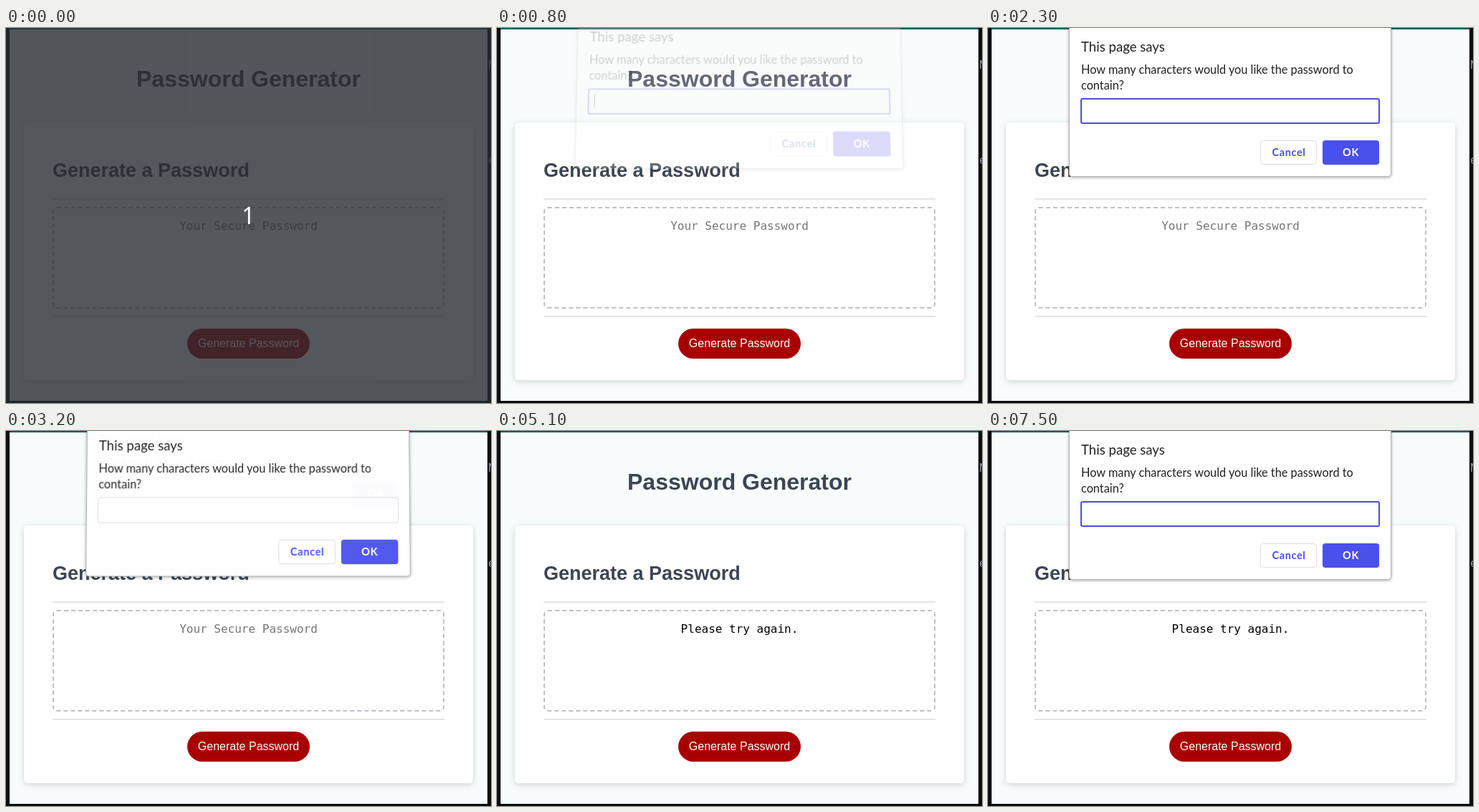
Recreate the animation shown at these times as an HTML page. Size 677x524 px, loop 8 s.

```html
<!DOCTYPE html>
<html lang="en">
<head>
<meta charset="utf-8">
<title>Password Generator</title>
<style>
  html, body { margin: 0; width: 100%; height: 100%; overflow: hidden; background: #0b0b0d; }
  svg, div { position: absolute; left: 0; top: 0; }
  svg { width: 677px; height: 524px; overflow: visible; }
  #stage { width: 677px; height: 524px; overflow: hidden; }
  #output {
    left: 65px; top: 250px; width: 547px; height: 142px; box-sizing: border-box;
    border: 2px dashed #c0c0c8; border-radius: 6px;
  }
  .sans { font-family: "Liberation Sans", Arial, sans-serif; }
  .mono { font-family: "DejaVu Sans Mono", monospace; font-size: 16px; }
  .heading { font-weight: bold; fill: #3c4553; }
  .middle { text-anchor: middle; }
  .card { fill: #fff; filter: drop-shadow(0 2px 4px rgba(0, 0, 0, .17)); }
  .dialog { font: 16.3px Lato, sans-serif; fill: #1f2023; transform-origin: 338px 0; }
  .dialog .title { font-size: 18.6px; }
  .dialog .label { font-size: 14.5px; font-weight: bold; letter-spacing: .6px; text-anchor: middle; }
  .panel { fill: #fff; stroke: #b4b4b6; filter: drop-shadow(0 1px 2px rgba(0, 0, 0, .35)); }
  .blue { fill: #4a50ec; }
  .white { fill: #fff; }
  .outline { fill: #fff; stroke: #dadce0; }
  .hover { fill: #fff; }
</style>
</head>
<body>
<div id="stage">
  <svg>
    <rect width="677" height="524" fill="#0b0b0d"/>
    <rect x="5" width="667" height="521" fill="#f7fdfc"/>
    <rect x="5" width="667" height="2" fill="#1b5a62"/>
    <g class="mono" font-size="14" fill="#8a8fa3">
      <text x="673" y="57">N</text>
      <text x="673" y="190">e</text>
    </g>
    <rect class="card" x="25" y="132" width="627" height="360" rx="5"/>
    <g class="sans">
      <text class="heading middle" x="338.5" y="82" font-size="32">Password Generator</text>
      <text class="heading" x="65" y="208" font-size="27">Generate a Password</text>
      <path d="M65 239H612M65 403H612" stroke="#e3e4e6" stroke-width="2"/>
      <rect x="253" y="420" width="171" height="42" rx="21" fill="#a80000"/>
      <text class="white middle" x="338.5" y="446" font-size="16">Generate Password</text>
    </g>
    <text id="message" class="mono middle" x="338.5" y="282"></text>
  </svg>
  <div id="output"></div>

  <svg id="prompt" class="dialog">
    <rect class="panel" x="113.5" y="-40" width="449" height="247.5" rx="4"/>
    <text class="title" x="130" y="33">This page says</text>
    <text x="130" y="64">How many characters would you like the password to</text>
    <text x="130" y="86">contain?</text>
    <rect class="outline" x="129.5" y="98.5" width="417" height="35" rx="3"/>
    <rect id="focus" x="130" y="99" width="416" height="34" rx="2" fill="#fff" stroke="#4a50dc" stroke-width="2"/>
    <rect id="caret" x="138" y="107" width="1" height="17"/>
    <rect class="outline" x="380.5" y="157.5" width="78" height="33" rx="4"/>
    <text class="label blue" x="420" y="179">Cancel</text>
    <rect class="blue" x="467" y="157" width="79" height="34" rx="4"/>
    <rect id="promptHover" class="hover" x="467" y="157" width="79" height="34" rx="4"/>
    <text class="label white" x="506.5" y="179">OK</text>
  </svg>

  <svg id="alert" class="dialog">
    <rect class="panel" x="113.5" y="-40" width="449" height="175.5" rx="4"/>
    <text class="title" x="130" y="33">This page says</text>
    <text x="130" y="64">Input must be an integer.</text>
    <rect class="blue" x="481" y="84" width="66" height="36" rx="4"/>
    <rect id="alertHover" class="hover" x="481" y="84" width="66" height="36" rx="4"/>
    <rect x="483.5" y="86.5" width="61" height="31" rx="3" fill="none" stroke="#fff"/>
    <text class="label white" x="514.5" y="107">OK</text>
  </svg>

  <svg id="countdown">
    <rect width="677" height="524" fill="rgba(41, 44, 50, .795)"/>
    <text class="white middle" x="338.5" y="274" font-size="32" font-family="Noto Sans, sans-serif">1</text>
  </svg>
</div>

<script>
const LOOP = 8000, STEP = 100;
const el = id => document.getElementById(id);

// Poses: [start ms, tilt, opacity]
const promptPoses = [
  [0, 1, 0], [800, 1, .2], [900, .45, .95], [1000, 0, 1],
  [3200, .42, 1], [3300, 1, .2], [3400, 1, 0],
  [6100, .65, .71], [6200, 0, 1]
];
const alertPoses = [
  [0, 1, 0], [3200, 1, .03], [3300, .62, .75], [3400, 0, 1],
  [4900, .42, 1], [5000, 1, .2], [5100, 1, 0]
];

const show = (node, visible) => node.style.visibility = visible ? "visible" : "hidden";
const ramp = (t, from, length) => Math.min(1, Math.max(0, (t - from) / length));

// Swings a dialog about its top edge, bottom towards the viewer.
function pose(node, poses, t) {
  const [, tilt, opacity] = poses.findLast(p => p[0] <= t);
  node.style.opacity = opacity;
  node.style.transform = tilt
    ? `matrix3d(1,0,0,0, 0,${1 - .005 * tilt},0,${(-.0000943 * tilt).toFixed(8)}, 0,0,1,0, 0,${-13.9 * tilt},0,1)`
    : "none";
}

function caretOn(t) {
  if (t >= 3100 && t < 6100) return false;
  const opened = t < 6100 ? 800 : 6000;
  return (t - opened) % 1000 < 500;
}

function draw(now) {
  const t = Math.floor(now % LOOP / STEP) * STEP;
  show(el("countdown"), t < 100);
  pose(el("prompt"), promptPoses, t);
  pose(el("alert"), alertPoses, t);
  show(el("focus"), t < 3100 || t >= 6100);
  show(el("caret"), caretOn(t));
  el("promptHover").style.opacity = t < 6000 ? .05 * ramp(t, 2300, 300) : 0;
  el("alertHover").style.opacity = .05 * ramp(t, 4600, 200);

  const retry = t >= 5000;
  el("message").textContent = retry ? "Please try again." : "Your Secure Password";
  el("message").style.fill = retry ? "#000" : "#757575";
}

function tick() {
  draw(performance.now());
  requestAnimationFrame(tick);
}
tick();
</script>
</body>
</html>
```
